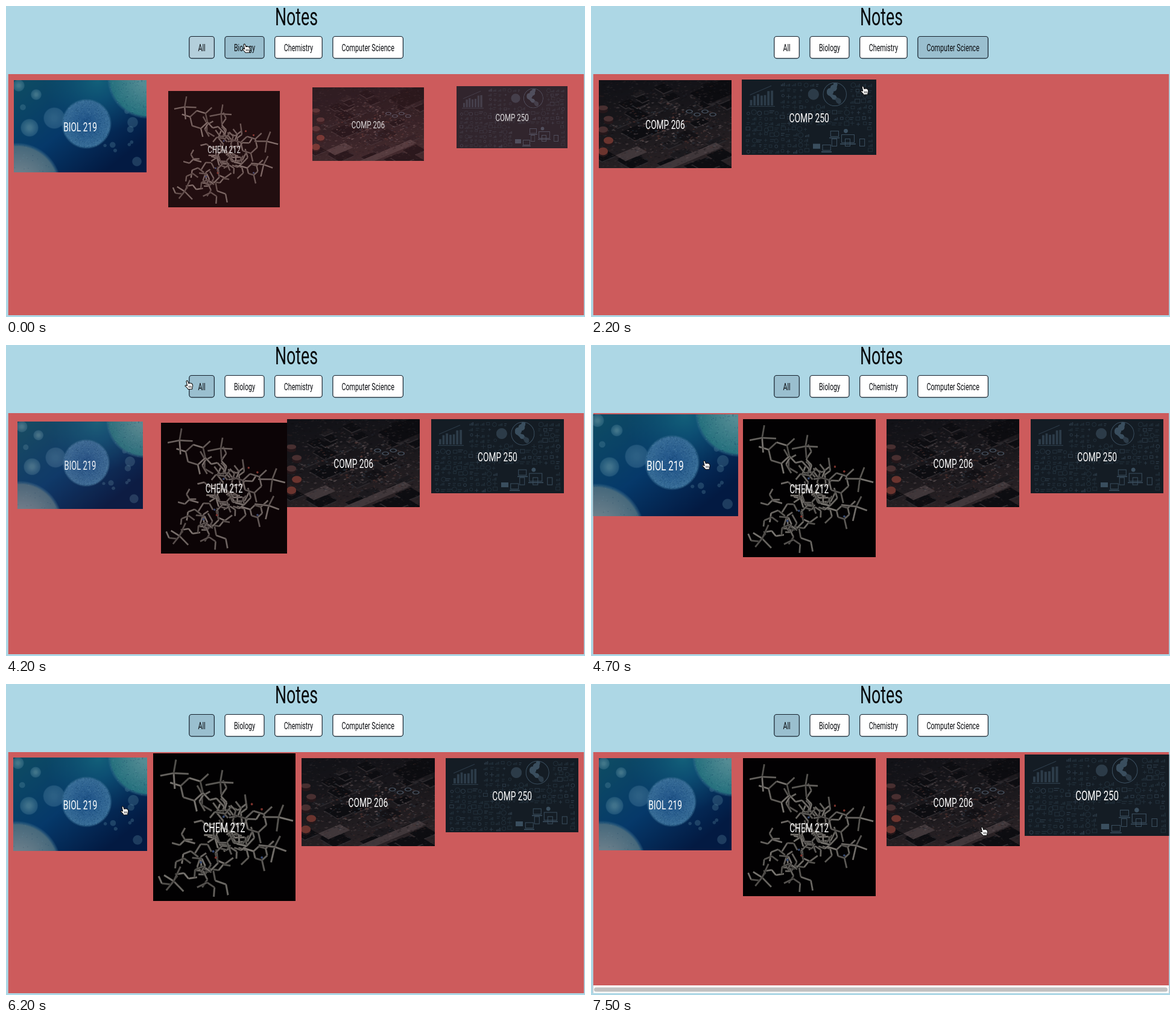
These frames come from a looping animation (960x516 px, 7.6 s). An HTML page with a canvas:

```html
<!DOCTYPE html>
<html lang="en">
<head>
<meta charset="utf-8">
<title>Notes</title>
<style>
  html, body { margin: 0; width: 100%; height: 100%; overflow: hidden; background: #add7e5; }
  canvas { display: block; width: 960px; height: 516px; }
</style>
</head>
<body>
<canvas id="stage" width="960" height="516"></canvas>
<script>
const ctx = document.getElementById('stage').getContext('2d');
const LOOP = 7600, STEP = 100, TAU = Math.PI * 2;
const FOREVER = 9e4, BEFORE = -9e4;
const BOX = { x: 3.5, y: 113, w: 955, h: 400 };
const EDGE = BOX.x + BOX.w;

// ---- helpers ----
function random(seed) {
  return () => {
    seed = (seed + 0x6D2B79F5) | 0;
    let r = Math.imul(seed ^ seed >>> 15, 1 | seed);
    r = r + Math.imul(r ^ r >>> 7, 61 | r) ^ r;
    return ((r ^ r >>> 14) >>> 0) / 4294967296;
  };
}

// cubic-bezier(.25, .1, .25, 1)
function ease(p) {
  if (p <= 0) return 0;
  if (p >= 1) return 1;
  let lo = 0, hi = 1, u = 0.5;
  for (let i = 0; i < 18; i++) {
    u = (lo + hi) / 2;
    const x = 0.75 * u * (1 - u) + u * u * u;
    if (x < p) lo = u; else hi = u;
  }
  return 0.3 * u * (1 - u) ** 2 + 3 * u * u * (1 - u) + u ** 3;
}

// how far a transition is "on", given the spans when its state holds
function level(t, spans, ms) {
  let v = 0;
  for (const [a, b] of spans) v += ease((t - a) / ms) - ease((t - b) / ms);
  return Math.min(1, Math.max(0, v));
}

function disc(g, x, y, r, fill) {
  g.fillStyle = fill;
  g.beginPath();
  g.arc(x, y, r, 0, TAU);
  g.fill();
}

function line(g, x1, y1, x2, y2) {
  g.beginPath();
  g.moveTo(x1, y1);
  g.lineTo(x2, y2);
  g.stroke();
}

// narrow lettering, one shared proportion for all text
const NARROW = 0.67;
function label(text, x, y, size, color) {
  ctx.save();
  ctx.translate(x, y);
  ctx.scale(NARROW, 1);
  ctx.font = `400 ${size}px Roboto, "Liberation Sans", sans-serif`;
  ctx.textAlign = 'center';
  ctx.fillStyle = color;
  ctx.fillText(text, 0, size * 0.355);
  ctx.restore();
}

function picture(w, h, paint) {
  const c = document.createElement('canvas');
  c.width = w * 2;
  c.height = h * 2;
  const g = c.getContext('2d');
  g.scale(2, 2);
  paint(g, w, h);
  return c;
}

function fade(g, w, h, grad, colors) {
  colors.forEach((c, i) => grad.addColorStop(i / (colors.length - 1), c));
  g.fillStyle = grad;
  g.fillRect(0, 0, w, h);
}

// ---- card pictures ----
function cells(g, w, h) {
  const rnd = random(5);
  fade(g, w, h, g.createLinearGradient(30, 0, 150, h), ['#0d4a64', '#06396a', '#031a42']);
  fade(g, w, h, g.createRadialGradient(140, 0, 0, 140, 0, 90), ['rgba(24,112,130,.7)', 'rgba(16,90,120,0)']);

  const sphere = (x, y, r, inner, outer, grains = 0) => {
    const f = g.createRadialGradient(x, y, r * 0.2, x, y, r);
    f.addColorStop(0, inner);
    f.addColorStop(0.9, outer);
    f.addColorStop(1, 'rgba(50,105,140,.1)');
    disc(g, x, y, r, f);
    for (let i = 0; i < grains; i++) {
      const a = rnd() * TAU, d = Math.sqrt(rnd()) * r * 0.97;
      const tint = i % 2 ? 'rgba(110,160,185,.2)' : 'rgba(5,50,90,.22)';
      disc(g, x + Math.cos(a) * d, y + Math.sin(a) * d, 0.5 + rnd() * 0.4, tint);
    }
  };
  const haze = 'rgba(120,165,175,.5)', mist = 'rgba(100,150,170,.28)';
  for (let i = 0; i < 8; i++) sphere(150 + rnd() * 60, 45 + rnd() * 80, 2 + rnd() * 4, mist, mist);
  for (const [x, y, r] of [[26, 79, 15], [37, 24, 9], [8, 9, 10]]) sphere(x, y, r, haze, mist);
  for (const [x, y, r] of [[204, 135, 8], [197, 70, 9], [15, 45, 5]]) sphere(x, y, r, mist, mist);
  sphere(67, 63, 18, 'rgba(80,130,160,.5)', 'rgba(65,115,150,.45)');
  sphere(222, -3, 67, '#548c94', '#26717e', 900);
  sphere(5, 178, 74, '#75858f', '#47697c', 200);
  sphere(120.5, 72.5, 41.5, '#22568a', '#376c97', 1000);
}

function molecule(g, w, h) {
  const rnd = random(23);
  g.fillStyle = '#020102';
  g.fillRect(0, 0, w, h);
  const stick = (x, y, dir, len) => {
    const nx = x + Math.cos(dir) * len, ny = y + Math.sin(dir) * len;
    const tone = 80 + rnd() * 45;
    for (const [width, k] of [[3.4, 0.42], [2.3, 1]]) {
      g.lineWidth = width;
      g.strokeStyle = `rgb(${tone * k},${tone * k * 0.97},${tone * k * 0.93})`;
      line(g, x, y, nx, ny);
    }
    return [nx, ny];
  };
  const zigzag = (x, y, dir, n) => {
    for (let k = 0; k < n; k++) {
      [x, y] = stick(x, y, dir, 10 + rnd() * 8);
      dir += (rnd() < 0.5 ? 1 : -1) * Math.PI / 3;
    }
  };
  const ring = (x, y, r) => {
    for (let k = 0; k < 6; k++) {
      const a = k * TAU / 6 + 0.3;
      stick(x + Math.cos(a) * r, y + Math.sin(a) * r, a + TAU / 3, r);
      if (k % 2) stick(x + Math.cos(a) * r, y + Math.sin(a) * r, a, 17);
    }
  };
  const star = (x, y, turn) => {
    for (let k = 0; k < 4; k++) stick(x, y, turn + k * 1.45, 17 + rnd() * 8);
  };

  // crowded middle, then a looser tail to the lower left
  const crowd = (cx, cy, rx, ry, n) => {
    for (let i = 0; i < n; i++) {
      const a = rnd() * TAU, d = Math.sqrt(rnd());
      zigzag(cx + Math.cos(a) * d * rx, cy + Math.sin(a) * d * ry, rnd() * TAU, 3);
    }
  };
  crowd(108, 95, 36, 36, 18);
  crowd(100, 142, 46, 28, 18);
  crowd(68, 182, 36, 16, 12);
  ring(60, 56, 18);
  ring(159, 106, 17);
  ring(166, 155, 11);
  star(32, 31, -1.4);
  star(194, 99, -1.2);
  star(188, 145, -1.1);
  star(32, 198, 0.8);
  star(104, 45, -1.4);
  zigzag(94, 222, -1.5, 3);
  for (let i = 0; i < 7; i++) disc(g, 70 + rnd() * 100, 65 + rnd() * 120, 1.8, i % 3 ? '#35486f' : '#7a332c');
}

function board(g, w, h) {
  const rnd = random(41);
  fade(g, w, h, g.createLinearGradient(60, 0, 90, h), ['#121217', '#19171b', '#292225']);

  // parts lie on a tilted plane, larger towards the bottom
  const part = (x, y, pw, ph, fill) => {
    g.save();
    g.translate(x, y);
    g.transform(1, -0.42, 0.75, 0.45, 0, 0);
    g.fillStyle = fill;
    g.fillRect(-pw / 2, -ph / 2, pw, ph);
    g.restore();
  };
  for (let i = 0; i < 34; i++) {
    const y = rnd() * h, s = 8 + rnd() * 12 + y * 0.1;
    const x = rnd() * w, tall = s * (0.5 + rnd());
    part(x, y + 2, s, tall, '#2b282c');
    part(x, y, s, tall, i % 3 ? '#0d0d11' : '#1b191d');
  }
  part(196, 18, 60, 40, '#0c0c10');
  part(150, 128, 100, 16, '#40373a');
  part(54, 122, 36, 22, '#40373a');
  part(145, 92, 24, 24, '#141216');
  const tints = ['#57494b', '#746768', '#2d3742', '#553530', '#0d0c10', '#0d0c10'];
  for (let i = 0; i < 1300; i++) {
    const x = rnd() * w, y = rnd() * h;
    const near = Math.max(0, 1 - Math.hypot((x - 118) / 120, (y - 78) / 62));
    g.globalAlpha = 0.15 + near * 0.75;
    part(x, y, 1 + rnd() * 3, 1 + rnd() * 3, tints[Math.floor(rnd() * tints.length)]);
  }
  g.globalAlpha = 1;
  const oval = (x, y, rx, ry, fill) => {
    g.fillStyle = fill;
    g.beginPath();
    g.ellipse(x, y, rx, ry, 0, 0, TAU);
    g.fill();
  };
  for (let i = 0; i < 4; i++) {
    oval(150 + i * 13, 52 + i % 2 * 5, 6, 3.2, '#424b57');
    oval(150 + i * 13, 52 + i % 2 * 5, 4, 2, '#15151a');
  }
  for (let i = 0; i < 5; i++) {
    const x = 7 + i % 2 * 9, y = 46 + i * 18;
    oval(x, y + 4, 8, 5, '#25171a');
    oval(x, y, 8, 4 + i * 0.6, i > 2 ? '#6b342e' : '#482f30');
  }
}

function icons(g, w, h) {
  const rnd = random(77);
  g.fillStyle = '#141c24';
  g.fillRect(0, 0, w, h);
  const dim = '#22303b', mid = '#2c3b48', lit = '#3a4e5e';
  const paint = color => { g.fillStyle = g.strokeStyle = color; };
  const bars = (x, y, n, wide, rise) => {
    for (let i = 0; i < n; i++) {
      const tall = rise * (0.4 + i / n + rnd() * 0.4);
      g.fillRect(x + i * wide * 1.5, y - tall, wide, tall);
    }
  };
  const taken = (x, y) => Math.hypot(x - 152, y - 24) < 27 || (x < 58 && y < 48) ||
    Math.hypot(x - 117, y - 24) < 14 || (x > 112 && x < 207 && y > 78);
  for (let y = 9; y < h - 4; y += 9) {
    for (let x = 10; x < w - 6; x += 9.5) {
      if (taken(x, y)) continue;
      const px = x + rnd() * 3 - 1.5, py = y + rnd() * 3 - 1.5, s = 2 + rnd() * 2.2;
      const kind = Math.floor(rnd() * 5);
      paint(rnd() < 0.25 ? mid : dim);
      if (kind === 0) g.strokeRect(px - s, py - s, s * 2, s * 1.6);
      else if (kind === 1) { g.beginPath(); g.arc(px, py, s, 0, TAU); g.stroke(); }
      else if (kind === 2) bars(px - 3, py + 3, 3, 1.6, 4);
      else if (kind === 3) { line(g, px - s, py, px + s, py); line(g, px, py - s, px, py + s); }
      else { g.fillRect(px - s, py - 2, s * 2, 1.2); g.fillRect(px - s, py + 1, s * 1.5, 1.2); }
    }
  }
  paint(mid);
  bars(13, 42, 7, 3.8, 17);
  g.fillRect(11, 43, 43, 1.2);
  line(g, 13, 25, 48, 10);
  disc(g, 117, 24, 9, mid);

  // globe
  paint(lit);
  g.beginPath();
  g.arc(152, 24, 19, 0, TAU);
  g.stroke();
  g.save();
  g.clip();
  for (let i = 0; i < 16; i++) {
    const a = i * 0.42;
    disc(g, 147 + Math.cos(a) * 6 + i * 0.4, 8 + i * 1.9, 2 + rnd() * 4, i < 13 ? lit : mid);
  }
  g.restore();

  // devices
  const screen = (x, y, sw, sh) => {
    paint(lit);
    g.strokeRect(x, y, sw, sh);
    g.fillRect(x - 2, y + sh + 1.5, sw + 4, 1.6);
  };
  screen(145, 84, 13, 9);
  screen(163, 90, 21, 13);
  screen(132, 107, 13, 9);
  for (let i = 0; i < 3; i++) g.strokeRect(147 + i * 21 + i * i, 97, 8, 12);
  g.fillRect(116, 105, 12, 8);
  disc(g, 170, 84, 3.5, lit);
}

// ---- page state over time ----
const CLICK = { bio: -55, comp: 1700, all: 3912 };
const PAGE = {
  bio: [CLICK.bio, CLICK.comp],
  comp: [CLICK.comp, CLICK.all],
  before: [BEFORE, CLICK.bio],
  all: [CLICK.all, FOREVER]
};

// both COMP cards move up while they are filtered, then slide back
const shift = t => t < CLICK.comp ? 2 : 2 * ease((t - CLICK.all) / 400);

const cards = [
  { name: 'BIOL 219', h: 153, paint: cells, slot: () => 0, shown: [PAGE.before, PAGE.bio, PAGE.all] },
  { name: 'CHEM 212', h: 229, paint: molecule, slot: () => 1, shown: [PAGE.before, PAGE.all] },
  { name: 'COMP 206', h: 146, paint: board, slot: shift, shown: [PAGE.before, PAGE.comp, PAGE.all] },
  { name: 'COMP 250', h: 123, paint: icons, slot: t => 1 + shift(t), shown: [PAGE.before, PAGE.comp, PAGE.all] }
];

const buttons = [
  { text: 'All', w: 41.5, active: [PAGE.before, PAGE.all] },
  { text: 'Biology', w: 65, active: [PAGE.bio] },
  { text: 'Chemistry', w: 78.5, active: [] },
  { text: 'Computer Science', w: 116.5, active: [PAGE.comp] }
];
let left = 303.8;
for (const b of buttons) {
  b.x = left;
  left += b.w + 17.7;
}

// where the hand rests or turns
const stops = [
  [0, 398, 70], [800, 398, 70], [1300, 597, 70], [1800, 597, 70], [2500, 360, 185], [2950, 360, 185],
  [3100, 327, 72], [3900, 327, 72], [4200, 303, 66], [4500, 100, 200], [5400, 818, 191], [5600, 818, 191],
  [6355, 120, 212], [7100, 840, 195], [7450, 840, 195], [7500, 651, 244]
];

function pointer(t) {
  let i = 0;
  while (i < stops.length - 2 && stops[i + 1][0] <= t) i++;
  const [t0, x0, y0] = stops[i], [t1, x1, y1] = stops[i + 1];
  const p = Math.min(1, (t - t0) / (t1 - t0)), s = p * p * (3 - 2 * p);
  return [x0 + (x1 - x0) * s, y0 + (y1 - y0) * s];
}

const cardX = (c, t) => 123 + c.slot(t) * 238.7;

// follow the hand once and note when it is over a thing
function hoverSpans(hit) {
  const spans = [];
  let from = null;
  for (let t = 0; t <= LOOP; t += 5) {
    const over = hit(t, ...pointer(t));
    if (over && from === null) from = t || BEFORE;
    if (!over && from !== null) {
      spans.push([from, t]);
      from = null;
    }
  }
  if (from !== null) spans.push([from, FOREVER]);
  return spans;
}

for (const c of cards) {
  c.image = picture(220, c.h, c.paint);
  c.hover = hoverSpans((t, x, y) => level(t, c.shown, 400) > 0.5 &&
    Math.abs(x - cardX(c, t)) < 110 && y > 123 && y < 123 + c.h);
}
for (const b of buttons)
  b.on = b.active.concat(hoverSpans((t, x, y) => x > b.x && x < b.x + b.w && y > 50 && y < 87));

// ---- drawing ----
function drawButton(b, t) {
  const k = level(t, b.on, 300);
  const mix = (a, z) => Math.round(a + (z - a) * k);
  ctx.beginPath();
  ctx.roundRect(b.x, 50.5, b.w, 36.3, 4);
  ctx.fillStyle = `rgb(${mix(255, 154)},${mix(255, 191)},${mix(255, 207)})`;
  ctx.fill();
  ctx.strokeStyle = '#14202c';
  ctx.lineWidth = 1.2;
  ctx.stroke();
  label(b.text, b.x + b.w / 2, 69.5, 16, '#0a0c10');
}

function drawCard(c, t) {
  const shown = level(t, c.shown, 400);
  if (shown < 0.002) return 0;
  const size = shown * (1 + 0.1 * level(t, c.hover, 300));
  const x = cardX(c, t);
  ctx.save();
  ctx.globalAlpha = shown;
  ctx.translate(x, 123 + c.h / 2);
  ctx.scale(size, size);
  ctx.drawImage(c.image, -110, -c.h / 2, 220, c.h);
  label(c.name, 0, 0.8, 20.5, '#fff');
  ctx.restore();
  return x + 110 * size;
}

function drawScrollbar(right) {
  ctx.fillStyle = '#fafafa';
  ctx.fillRect(BOX.x, 500, BOX.w, 13);
  ctx.fillStyle = '#c1c1c1';
  ctx.beginPath();
  ctx.roundRect(5, 503.5, 952 - (right - EDGE), 7, 3.5);
  ctx.fill();
}

function drawHand([x, y]) {
  ctx.save();
  ctx.translate(x - 6.5, y - 7.5);
  ctx.beginPath();
  ctx.moveTo(2.4, 1.8);
  ctx.quadraticCurveTo(3.7, -0.4, 5, 1.6);
  ctx.lineTo(6.2, 5.2);
  ctx.quadraticCurveTo(10, 4, 12, 6);
  ctx.quadraticCurveTo(14, 8, 12.2, 12.4);
  ctx.lineTo(12.2, 14.6);
  ctx.lineTo(5.6, 15);
  ctx.quadraticCurveTo(3.6, 11.8, 0.5, 9.6);
  ctx.quadraticCurveTo(0.4, 7.6, 4, 8.9);
  ctx.closePath();
  ctx.fillStyle = '#fff';
  ctx.fill();
  ctx.strokeStyle = '#111';
  ctx.lineWidth = 1.1;
  ctx.lineJoin = 'round';
  ctx.stroke();
  ctx.lineWidth = 0.8;
  for (let i = 0; i < 3; i++) line(ctx, 6.6 + i * 1.9, 9.2, 6.8 + i * 1.9, 12.4);
  ctx.restore();
}

function draw(t) {
  ctx.fillStyle = '#add7e5';
  ctx.fillRect(0, 0, 960, 516);
  label('Notes', 481.5, 18, 40, '#080a0c');
  for (const b of buttons) drawButton(b, t);

  ctx.save();
  ctx.beginPath();
  ctx.rect(BOX.x, BOX.y, BOX.w, BOX.h);
  ctx.clip();
  ctx.fillStyle = '#cd5b5c';
  ctx.fillRect(BOX.x, BOX.y, BOX.w, BOX.h);
  const right = Math.max(...cards.map(c => drawCard(c, t)));
  if (right > EDGE) drawScrollbar(right);
  ctx.restore();

  drawHand(pointer(t));
}

const start = performance.now();
function tick() {
  const t = (performance.now() - start) % LOOP;
  draw(Math.floor(t / STEP) * STEP);
  requestAnimationFrame(tick);
}
tick();
</script>
</body>
</html>
```
